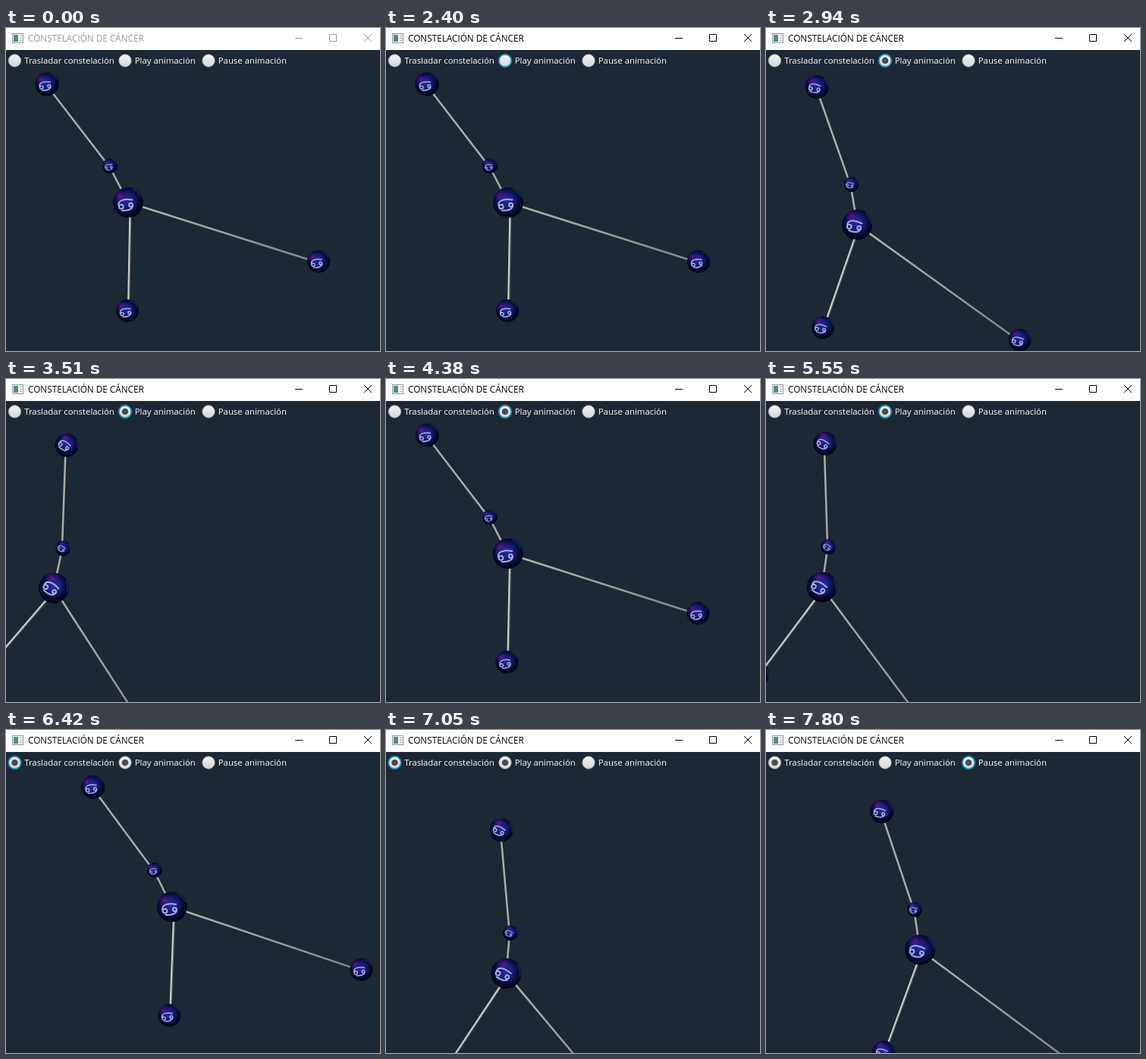
These frames come from a looping animation (493x426 px, 8000 ms). An HTML page:

```html
<!DOCTYPE html>
<html lang="es">
<head>
<meta charset="utf-8">
<title>Constelación de Cáncer</title>
<style>
  html, body { margin: 0; width: 100%; height: 100%; overflow: hidden; background: #1c2833; }
  svg { display: block; width: 493px; height: 426px; }
  text { font: 11.4px "Open Sans", "Noto Sans", sans-serif; fill: #fff; }
  #title { font-size: 11.75px; fill: #000; }
  #buttons { fill: none; stroke: #000; }
  .inactive #title { fill: #999; }
  .inactive #buttons { stroke: #999; }
  .ring, .dot { visibility: hidden; }
  .focus .ring, .on .dot { visibility: visible; }
</style>
</head>
<body>
<svg id="stage" viewBox="0 0 493 426">
  <defs>
    <radialGradient id="ball" cx=".46" cy=".45" r=".56">
      <stop offset="0" stop-color="#2230a4"/>
      <stop offset=".4" stop-color="#171d78"/>
      <stop offset=".7" stop-color="#0a0c3a"/>
      <stop offset="1" stop-color="#02030c"/>
    </radialGradient>
    <radialGradient id="haze">
      <stop offset="0" stop-color="#6a1a98" stop-opacity=".8"/>
      <stop offset="1" stop-color="#3a1080" stop-opacity="0"/>
    </radialGradient>
    <linearGradient id="button" x2="0" y2="1">
      <stop offset="0" stop-color="#f4f4f4"/>
      <stop offset="1" stop-color="#d6d6d6"/>
    </linearGradient>
    <linearGradient id="rod" gradientUnits="userSpaceOnUse" x1="161" y1="230" x2="412" y2="308">
      <stop offset="0" stop-color="#b4b4ae"/>
      <stop offset="1" stop-color="#858585"/>
    </linearGradient>
    <g id="star">
      <circle r="20" fill="url(#ball)"/>
      <circle cx="-10" cy="-8" r="10" fill="url(#haze)"/>
      <path d="M6 -17.5A18.5 18.5 0 0 1 17 -7" fill="none" stroke="#0d4668" stroke-width="2" opacity=".6"/>
      <g transform="translate(-3 2.5) rotate(-6)" fill="none" stroke-linecap="round">
        <g id="sign">
          <circle cx="-6.5" cy="2.5" r="2.8"/>
          <path d="M-9.5 1.5C-11 -7 0 -7.5 9 -5"/>
          <circle cx="6.5" cy="1.5" r="2.4"/>
          <path d="M9 2.5C8 8 0 9 -6 7.5"/>
        </g>
      </g>
    </g>
  </defs>
  <style>#sign { stroke: #a8aeda; stroke-width: 2; }</style>

  <rect width="493" height="426" fill="#1c2833"/>
  <g id="sky">
    <g fill="none" stroke-width="2.5">
      <path d="M54 76L137 184L161 230" stroke="#acaca8"/>
      <path d="M161 230L412 309.5" stroke="url(#rod)"/>
      <path d="M165 235L162.5 370" stroke="#686e72" stroke-width="1.2"/>
      <path d="M163.5 235L161 370" stroke="#d2d2ce" stroke-width="2"/>
    </g>
  </g>

  <g id="radios"></g>

  <rect width="493" height="29" fill="#fff"/>
  <g>
    <rect x="8.5" y="7.5" width="14" height="12" fill="#f4f4f4" stroke="#8d979b"/>
    <rect x="10" y="9" width="6" height="9" fill="#4f8b88"/>
    <path d="M18 10.5H21M18 13.5H21M18 16.5H21" stroke="#a5adb0"/>
  </g>
  <text id="title" x="29" y="18">CONSTELACIÓN DE CÁNCER</text>
  <path id="buttons" d="M381 13.5H391M426.5 8.5H435.5V17.5H426.5ZM472 8L482 18M482 8L472 18"/>
</svg>
<script>
const LOOP = 8000, START = 2498, SWING = 958.5, MAX_ANGLE = 40, PAUSE = 7788;
const PIVOT = [48.5, 116.8];
const STARS = [[54, 74, 15.5], [137, 182, 10], [161, 230, 20], [412, 308, 15], [160, 373, 15]];
const RADIOS = [[11.5, 'Trasladar constelación'], [157, 'Play animación'], [267, 'Pause animación']];
const SHIFTS = [6060, 6270, 6480];

const byId = id => document.getElementById(id);
const stage = byId('stage'), sky = byId('sky'), radios = byId('radios');

sky.innerHTML += STARS.map(([x, y, r]) =>
  `<use href="#star" transform="translate(${x} ${y}) scale(${r / 20})"/>`).join('');

radios.innerHTML = RADIOS.map(([x, label]) => `<g>
  <g transform="translate(${x} 43)">
    <circle class="ring" r="9.4" fill="#0c5f7e"/>
    <circle r="8.2" fill="url(#button)" stroke="#a4a8aa" stroke-width=".8"/>
    <circle class="ring" r="8" fill="none" stroke="#1993c0" stroke-width="1.4"/>
    <circle class="dot" r="4.3" fill="#4c4c4c"/>
  </g>
  <text x="${x + 12.7}" y="47">${label}</text></g>`).join('');

// Quadratic ramps over the first and last fifth, constant speed between.
function easeBoth(p) {
  if (p < 0.2) return 3.125 * p * p;
  if (p > 0.8) return 1 - 3.125 * (1 - p) ** 2;
  return 1.25 * p - 0.125;
}

function angleAt(t) {
  const phase = Math.max(0, Math.min(t, PAUSE) - START) / SWING % 2;
  return MAX_ANGLE * easeBoth(phase > 1 ? 2 - phase : phase);
}

function focusAt(t) {
  if (t < 450) return -1;
  if (t < 2400) return 0;
  if (t < SHIFTS[0]) return 1;
  return t < PAUSE ? 0 : 2;
}

function draw(t) {
  const shift = 30 * SHIFTS.filter(s => t >= s).length;
  sky.setAttribute('transform', `rotate(${angleAt(t)} ${PIVOT}) translate(${shift} 0)`);
  stage.classList.toggle('inactive', t < 450);
  const focus = focusAt(t);
  const on = [t >= SHIFTS[0], t >= START && t < PAUSE, t >= PAUSE];
  [...radios.children].forEach((radio, i) => {
    radio.classList.toggle('focus', i === focus);
    radio.classList.toggle('on', on[i]);
  });
}

const began = performance.now();
function tick() {
  draw((performance.now() - began) % LOOP);
  requestAnimationFrame(tick);
}
tick();
</script>
</body>
</html>
```
